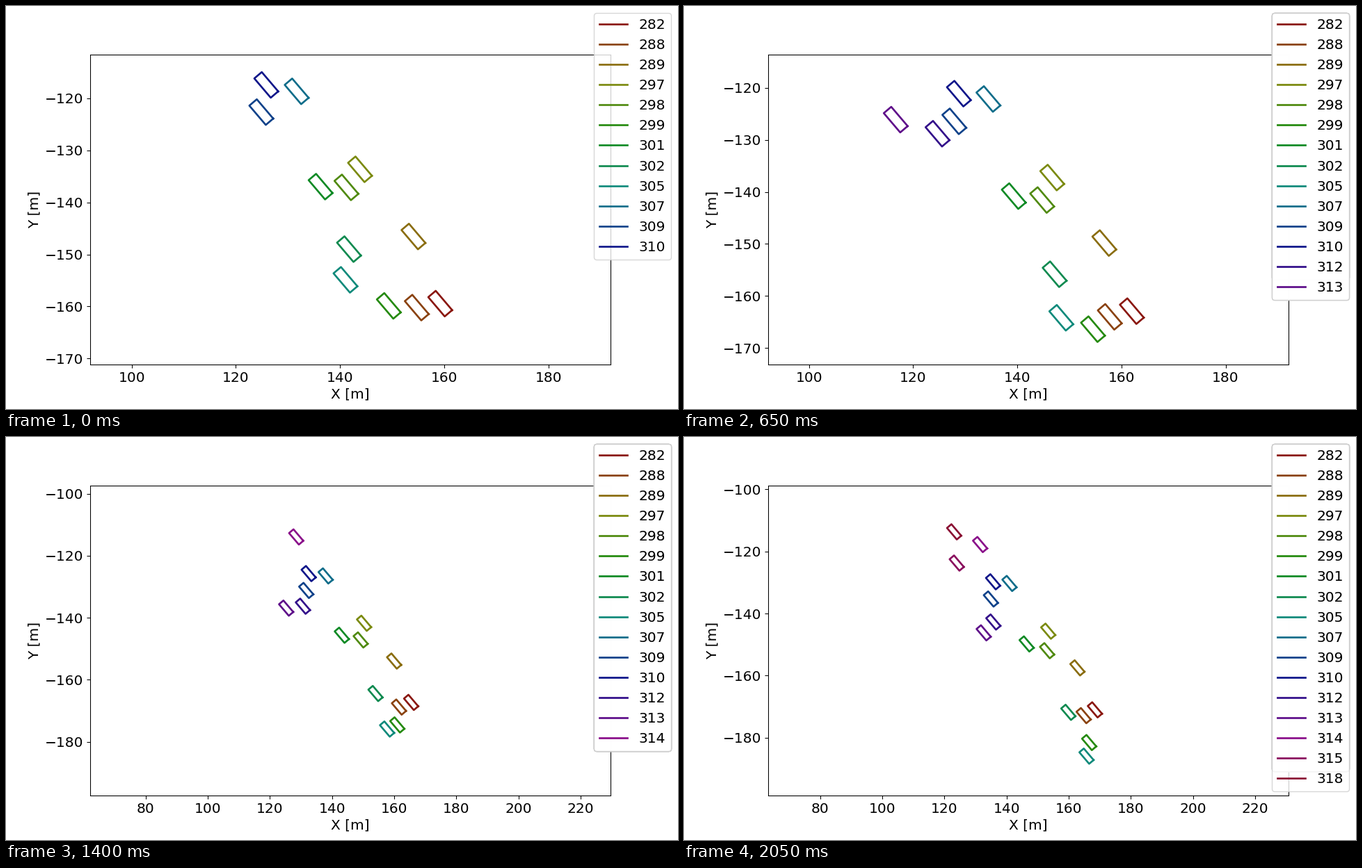
Write a matplotlib script that moves like this. It is 966x580 px and loops after 2100 ms.

```python
import colorsys

import matplotlib.pyplot as plt
import numpy as np
from matplotlib.animation import FuncAnimation

FRAMES = 42
INTERVAL = 50
SCALE = 0.966                   # text and line sizes relative to a 10 inch figure
LENGTH, WIDTH = 4.87, 1.88      # vehicle size in metres
VIEW = 100                      # metres shown along the limiting axis
OVERLAY = 8                     # translucent legends stacked on each other
INITIAL = 12                    # vehicles present from the start
ENTRY_GAP = 10                  # steps between two newcomers

# id: lane, starting distance along the road, distance driven (metres)
VEHICLES = {
    282: (3, 223.9, 14.8),
    288: (2, 221.7, 16.2),
    289: (4, 210.6, 14),
    297: (4, 194.1, 15.4),
    298: (2.95, 195.2, 19),
    299: (1, 218.1, 27.7),
    301: (2, 192, 16.4),
    302: (1.2, 204.8, 29.2),
    305: (0.15, 209, 39.7),
    307: (3.95, 174.8, 14.9),
    309: (2, 173.7, 16.2),
    310: (3, 170.2, 15.8),
    312: (1, 170.8, 25.4),
    313: (-0.15, 160.3, 36.7),
    314: (4.05, 159, 15),
    315: (1.65, 151.5, 22.5),
    318: (3.05, 150.6, 15),
}

ROAD = np.array([0.622, -0.783])
ACROSS = np.array([0.783, 0.622])
HEADING = np.radians(-49.6)


def first_step(i):
    return max(0, 1 + ENTRY_GAP * (i - INITIAL))


def hue_color(i):
    return colorsys.hls_to_rgb(0.01 + i / len(VEHICLES), 0.3, 0.8)


def center(vehicle, step):
    lane, start, travel = vehicle
    # The first step is held once before the vehicles move.
    progress = max(step - 1, 0) / (FRAMES - 2)
    return ROAD * (start + travel * progress) + ACROSS * (13.5 + 4 * lane)


def rectangle():
    along = np.array([np.cos(HEADING), np.sin(HEADING)]) * LENGTH / 2
    side = np.array([-np.sin(HEADING), np.cos(HEADING)]) * WIDTH / 2
    return np.array([along + side, along - side, -along - side,
                     side - along, along + side])


plt.rcParams["font.family"] = "DejaVu Sans"
plt.rcParams["font.size"] = 15
for key in ("font.size", "axes.linewidth", "axes.labelpad", "patch.linewidth",
            "xtick.major.size", "xtick.major.width", "xtick.major.pad",
            "ytick.major.size", "ytick.major.width", "ytick.major.pad"):
    plt.rcParams[key] *= SCALE

fig, ax = plt.subplots(figsize=(9.66, 5.8), dpi=100)
ax.set_xlabel("X [m]")
ax.set_ylabel("Y [m]")
box = ax.get_window_extent()
ratio = box.height / box.width
shape = rectangle()

lines = [ax.plot([], [], color=hue_color(i), lw=2 * SCALE, label=str(name))[0]
         for i, name in enumerate(VEHICLES)]

# Each step lays one more translucent legend over the earlier ones.
legends = []
for step in range(FRAMES):
    seen = [line for i, line in enumerate(lines) if first_step(i) <= step]
    legends.append(fig.legend(handles=seen, loc="upper right"))


def update(step):
    centers = []
    for i, (line, vehicle) in enumerate(zip(lines, VEHICLES.values())):
        shown = first_step(i) <= step
        line.set_visible(shown)
        if shown:
            pos = center(vehicle, step)
            line.set_data(*(pos + shape).T)
            centers.append(pos)

    # Follow the mean position and zoom out once the group gets too tall.
    cx, cy = np.mean(centers, axis=0)
    span = np.ptp(np.array(centers)[:, 1]) + np.ptp(shape[:, 1])
    width = VIEW if 1.05 * span < VIEW * ratio else VIEW / ratio
    height = width * ratio
    ax.set_xlim(cx - width / 2, cx + width / 2)
    ax.set_ylim(cy - height / 2, cy + height / 2)

    for k, legend in enumerate(legends):
        legend.set_visible(step - OVERLAY < k <= step)
    return lines


anim = FuncAnimation(fig, update, frames=FRAMES, interval=INTERVAL,
                     repeat=True, repeat_delay=0, blit=False)
plt.show()
```
